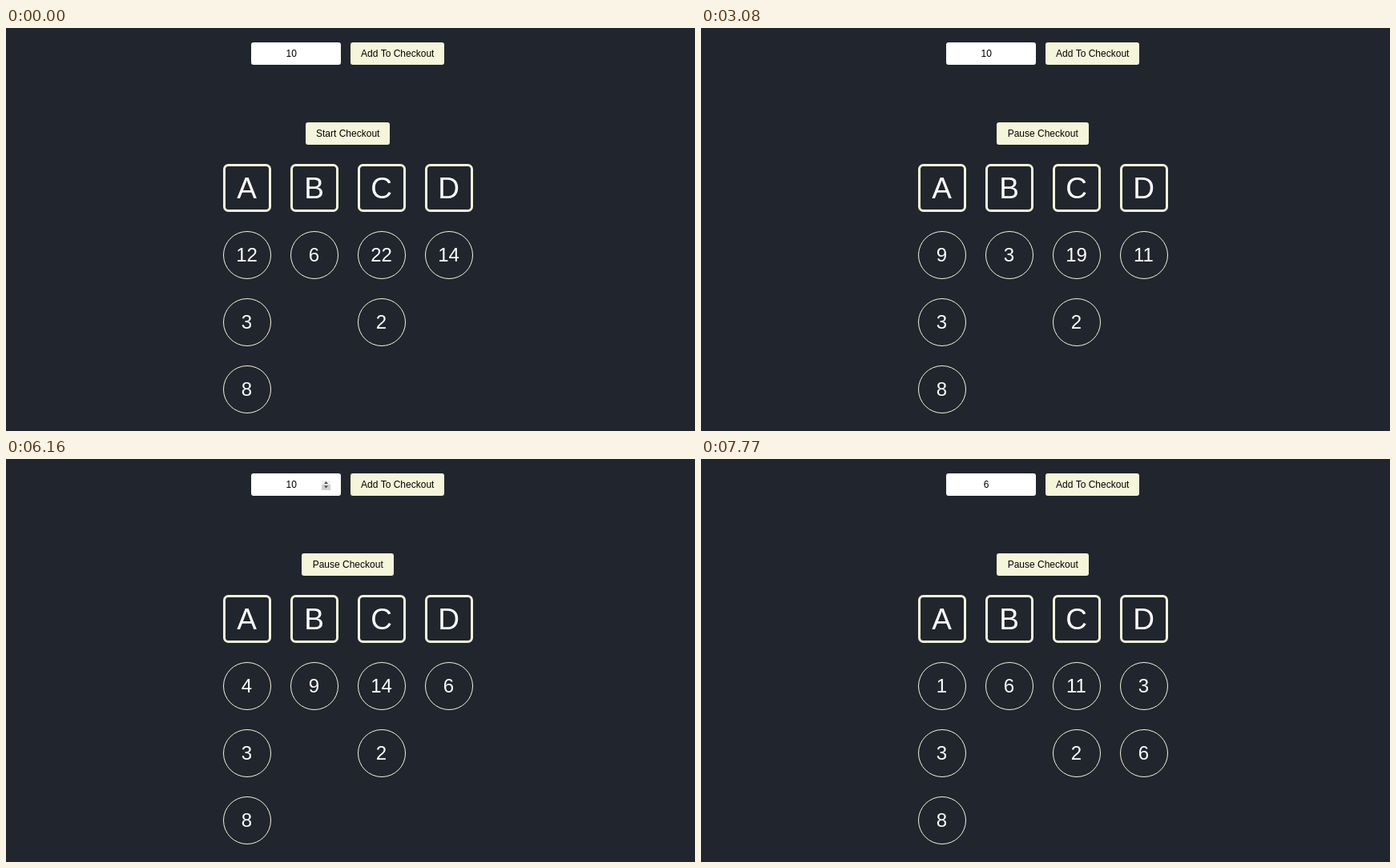
An HTML page with a canvas that plays this animation: 860x504 px, repeating every 8000 ms.

```html
<!DOCTYPE html>
<html lang="en">
<head>
<meta charset="utf-8">
<title>Checkout queues</title>
<style>
  html, body { margin: 0; width: 100%; height: 100%; overflow: hidden; background: #21252d; }
  canvas { display: block; }
</style>
</head>
<body>
<canvas id="stage" width="860" height="504"></canvas>
<script>
const ctx = document.getElementById('stage').getContext('2d');
const LOOP = 8000;
const BG = '#21252d', BEIGE = '#f5f5dc';
const FONT = '"Liberation Sans", Arial, sans-serif';

const START = 1470;
const TICKS = [2030, 2520, 3080, 3570, 4550, 5110, 5600, 6160, 6650, 7210, 7770];
const PRESSES = [[6230, 6370], [6440, 6580], [6720, 6860], [7070, 7140]];
const ADD_TEN = 4060, ADD_SIX = 7770;
const FOCUS = 6230, BLUR = 7630, CARET_OFF = 7560;
const SPINNER_ON = 5460, HOVER_ON = 5950, HOVER_OFF = 7280;

const within = (t, from, to) => t >= from && t < to;
const countUntil = (t, times) => times.filter(x => x <= t).length;

function text(str, x, baseline, size, color) {
  ctx.font = `${size}px ${FONT}`;
  ctx.textAlign = 'center';
  ctx.fillStyle = color;
  ctx.fillText(str, x, baseline);
}

function roundRect(x, y, w, h, r) {
  ctx.beginPath();
  ctx.roundRect(x, y, w, h, r);
}

function polygon(points) {
  ctx.beginPath();
  points.forEach(([x, y]) => ctx.lineTo(x, y));
  ctx.closePath();
}

function button(label, x, y, w) {
  roundRect(x, y, w, 28, 3);
  ctx.fillStyle = BEIGE;
  ctx.fill();
  text(label, x + w / 2 + 0.2, y + 18, 12, '#000');
}

function spinner(hover, pressed) {
  ctx.fillStyle = '#f2f2f2';
  ctx.fillRect(394, 27, 11, 12);
  if (hover) {
    ctx.fillStyle = pressed ? '#b8b8b8' : '#d0d0d0';
    ctx.fillRect(394, 32, 11, 7);
  }
  ctx.fillStyle = '#484848';
  polygon([[397, 31], [399.5, 28], [402, 31]]);
  ctx.fill();
  polygon([[397, 33.5], [399.5, 36.5], [402, 33.5]]);
  ctx.fill();
}

function pointer(x, y) {
  polygon([[0, 0], [0, 14.5], [3.4, 11.5], [5.7, 16.8], [8.5, 15.6], [6.3, 10.4], [10.8, 10.4]]
    .map(([dx, dy]) => [x + dx, y + dy]));
  ctx.fillStyle = '#000';
  ctx.fill();
  ctx.strokeStyle = '#fff';
  ctx.lineWidth = 1;
  ctx.stroke();
}

function numberInput(t) {
  const focused = within(t, FOCUS, BLUR);
  ctx.fillStyle = '#fff';
  if (focused) roundRect(305, 17, 114, 30, 4);
  else roundRect(306, 18, 112, 28, 3);
  ctx.fill();
  if (focused) {
    roundRect(307, 19, 110, 26, 3);
    ctx.strokeStyle = '#1160c9';
    ctx.lineWidth = 2;
    ctx.stroke();
  }
  const value = 10 - countUntil(t, PRESSES.map(p => p[0]));
  text(value, 356.2, 36, 12, '#000');
  if (within(t, FOCUS, CARET_OFF)) {
    ctx.fillStyle = '#000';
    ctx.fillRect(359, 25, 1, 14);
  }
  if (within(t, SPINNER_ON, BLUR)) {
    spinner(within(t, HOVER_ON, HOVER_OFF), PRESSES.some(([a, b]) => within(t, a, b)));
  }
}

function queues(t) {
  const n = countUntil(t, TICKS);
  const second = n < 7 ? [6 - n] : [17 - n];
  if (t >= ADD_TEN && n < 7) second.push(10);
  const last = [14 - n];
  if (t >= ADD_SIX) last.push(6);
  return [[12 - n, 3, 8], second, [22 - n, 2], last];
}

function lane(name, items, i) {
  const x = 301 + i * 84;
  ctx.strokeStyle = BEIGE;
  ctx.lineWidth = 3;
  roundRect(x - 28.5, 171.5, 57, 57, 5);
  ctx.stroke();
  text(name, x - 0.5, 213, 37, '#fff');
  items.forEach((item, row) => {
    const y = 284 + row * 84;
    ctx.lineWidth = 1;
    ctx.beginPath();
    ctx.arc(x, y, 29.5, 0, Math.PI * 2);
    ctx.stroke();
    text(item, x - 0.5, y + 8, 24, '#fff');
  });
}

function draw(t) {
  ctx.fillStyle = BG;
  ctx.fillRect(0, 0, 860, 504);
  numberInput(t);
  button('Add To Checkout', 430, 18, 117);
  if (t < START) button('Start Checkout', 374, 118, 105);
  else button('Pause Checkout', 369, 118, 115);
  queues(t).forEach((items, i) => lane('ABCD'[i], items, i));
  if (within(t, 6650, 6720)) pointer(399, 35);
}

const origin = performance.now();
function frame() {
  draw((performance.now() - origin) % LOOP);
  requestAnimationFrame(frame);
}
frame();
</script>
</body>
</html>
```
